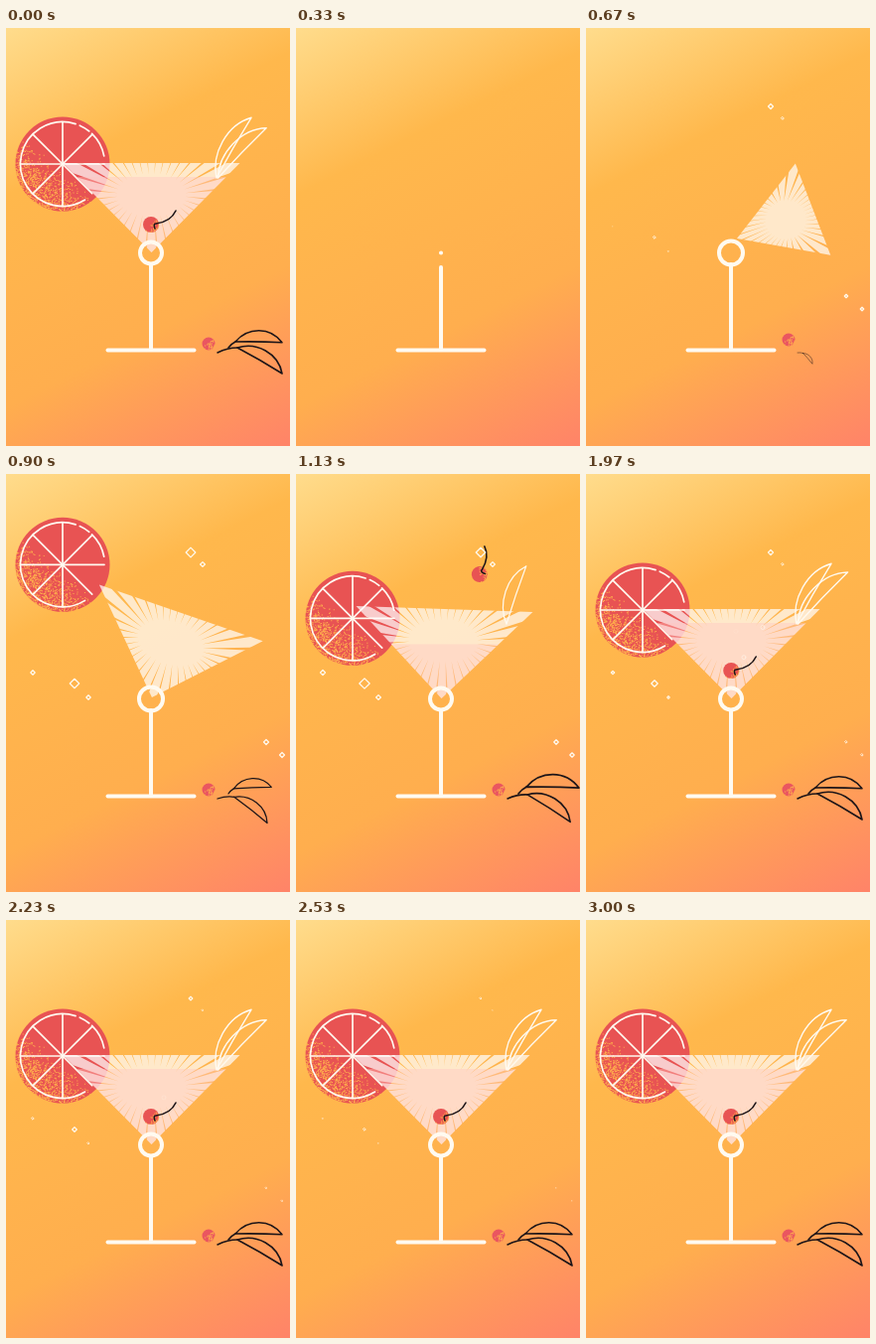
Animation, 286 px wide and 421 px high, one loop 3030 ms. Source, as an HTML page with a canvas:

```html
<!DOCTYPE html>
<html lang="en">
<head>
<meta charset="utf-8">
<title>Cocktail</title>
<style>
html, body { margin: 0; width: 100%; height: 100%; overflow: hidden; background: #ffb54a; }
canvas { display: block; }
</style>
</head>
<body>
<canvas id="stage" width="286" height="421"></canvas>
<script>
const ctx = document.getElementById('stage').getContext('2d');
const LOOP = 3030, RAD = Math.PI / 180, TURN = 2 * Math.PI;
const WHITE = '#fffaf0', RED = '#e85353', DARK = '#1d1518', ORANGE = '#ffb14c';

const clamp = v => Math.max(0, Math.min(1, v));
const mix = (a, b, p) => a + (b - a) * p;

// Cubic ease-out from 0 to 1; "over" makes it swing past 1 before settling.
function ease(t, start, duration, over = 0) {
  const u = clamp((t - start) / duration) - 1;
  return 1 + (1 + over) * u ** 3 + over * u ** 2;
}

function grain(radius, count, angle, bias) {
  let seed = 7;
  const rnd = () => (seed = seed * 16807 % 2147483647) / 2147483647;
  const path = new Path2D();
  for (let i = 0; i < count; i++) {
    const r = radius * Math.sqrt(rnd()), a = rnd() * TURN;
    const depth = r / radius * Math.cos(a - angle * RAD) + bias;
    if (rnd() < depth) path.rect(r * Math.cos(a) - .5, r * Math.sin(a) - .5, 1, 1);
  }
  return path;
}
const limeGrain = grain(47.5, 5500, 130, -.1);
const cherryGrain = grain(8, 130, 50, .1);
const berryGrain = grain(6.5, 100, 50, .3);

// Glass bowl: rays around a solid oval centre
const bowl = new Path2D('M0 0L-89-90H89Z');
const burst = new Path2D();
for (let i = 0; i < 36; i++) {
  const add = (rx, ry, deg) => burst.lineTo(rx * Math.cos(deg * RAD), -58 + ry * Math.sin(deg * RAD));
  add(100, 100, i * 10 - 3.8);
  add(100, 100, i * 10 + 3.8);
  add(34, 21, i * 10 + 5);
}
burst.closePath();

const leaf = new Path2D('M0 0C13-15 37-16 50 0Q25-1 0 0');
const cherryStem = new Path2D('M4 4Q2-1 5-1Q20-3 25-14');

const sky = ctx.createLinearGradient(0, 0, 226, 448);
sky.addColorStop(0, '#ffdc8c');
sky.addColorStop(.3, '#ffb84c');
sky.addColorStop(.68, '#ffae4e');
sky.addColorStop(1, '#ff8468');

function at(x, y, deg, sx, sy, draw) {
  if (sx <= 0 || sy <= 0) return;
  ctx.save();
  ctx.translate(x, y);
  ctx.rotate(deg * RAD);
  ctx.scale(sx, sy);
  draw();
  ctx.restore();
}

function stroke(path, color, width) {
  ctx.strokeStyle = color;
  ctx.lineWidth = width;
  ctx.stroke(path);
}

function arc(x, y, r, width, from = 0, to = 360) {
  const path = new Path2D();
  path.arc(x, y, r, from * RAD, to * RAD);
  stroke(path, WHITE, width);
}

function line(x1, y1, x2, y2, width) {
  stroke(new Path2D(`M${x1} ${y1}L${x2} ${y2}`), WHITE, width);
}

function disc(r, color, dots) {
  ctx.fillStyle = color;
  ctx.beginPath();
  ctx.arc(0, 0, r, 0, TURN);
  ctx.fill();
  ctx.fillStyle = ORANGE;
  ctx.fill(dots);
}

function lime(t) {
  at(57, mix(-50, 137, ease(t, 720, 700, 1.15)), 0, 1, 1, () => {
    disc(47.5, RED, limeGrain);
    for (let deg = 0; deg < 360; deg += 45)
      line(0, 0, 42 * Math.cos(deg * RAD), 42 * Math.sin(deg * RAD), 1.7);
    arc(0, 0, 42.5, 1.7, 58, 288);
    arc(0, 0, 42.5, 1.7, 294, 309);
    arc(0, 0, 42.5, 1.7, 314, 349);
  });
}

function glass(t) {
  const settle = ease(t, 670, 400);
  const angle = mix(110, 0, ease(t, 560, 770));
  at(mix(152, 146.5, settle), mix(212, 226, settle), angle, ease(t, 560, 470), ease(t, 560, 200), () => {
    ctx.clip(bowl);
    ctx.fillStyle = 'rgba(255,255,255,.7)';
    ctx.fill(burst);
    ctx.setTransform(1, 0, 0, 1, 0, 0);
    ctx.fillStyle = 'rgba(255,195,190,.4)';
    const level = mix(228, 150, ease(t, 900, 660));
    ctx.fillRect(0, level, 286, 230 - level);
  });
}

function cherry(t) {
  const x = mix(211, 146, ease(t, 940, 1210));
  const y = mix(-30, 198, ease(t, 940, 770));
  at(x, y, mix(-101, 0, ease(t, 940, 930)), 1, 1, () => {
    disc(8, RED, cherryGrain);
    stroke(cherryStem, DARK, 1.6);
  });
}

function topLeaf(x, start, fromAngle, toAngle) {
  return t => {
    const size = 1.4 * ease(t, start, 950, 2.8);
    at(x, 151, mix(fromAngle, toAngle, ease(t, start, 1000)), size, size * .8,
      () => stroke(leaf, WHITE, 1.2));
  };
}

function groundLeaves(t) {
  const low = ease(t, 600, 700), high = ease(t, 720, 800, 2);
  at(213, 327, mix(24, 0, ease(t, 600, 1000)), low, low, () => {
    stroke(new Path2D('M0 0Q10-5 20-5'), DARK, 1.6);
    at(20, -5, 30, 1.04, 1, () => stroke(leaf, DARK, 1.6));
  });
  at(224, 322, mix(-20, 0, ease(t, 720, 400)), high, high, () => {
    stroke(new Path2D('M0 0Q3-4 7-6'), DARK, 1.6);
    at(7, -6, 1, .94, 1, () => stroke(leaf, DARK, 1.6));
  });
}

function stand(t) {
  const half = 43.5 * ease(t, 30, 250);
  const height = 86 * ease(t, 130, 300);
  const ring = 11 * ease(t, 330, 800, 2);
  const berry = ease(t, 400, 250, 1.7);
  if (half > 0) line(146 - half, 324.4, 146 + half, 324.4, 4);
  if (height > 0) line(146, 324, 146, 324 - height, 4);
  if (ring > 0) arc(146, 226.5, ring, 4);
  at(204, 318 - 4 * Math.sin(Math.PI * clamp((t - 520) / 300)), 0, berry, berry,
    () => disc(6.5, '#ea5660', berryGrain));
}

function shine(t) {
  const spots = [[186, 79, 5], [198, 91, 2.5], [27, 200, 2.5], [69, 211, 5.2],
    [83, 225, 2.4], [262, 270, 2.7], [278, 283, 2.7]];
  for (const [x, y, size] of spots) {
    // Spots further right appear and fade sooner
    const peak = 1600 - 3 * x;
    const r = size * ease(t, 660 - x / 2, 500) * clamp((2900 - t) / (2900 - peak));
    if (r > .15)
      stroke(new Path2D(`M${x} ${y - r}l${r} ${r}l${-r} ${r}l${-r} ${-r}Z`), WHITE, Math.min(1.2, r * .7));
  }
  [[172, 170], [151, 163], [178, 156], [159, 183]].forEach(([x, y], i) => {
    const u = clamp((t - 1400 - 140 * i) / 450);
    ctx.globalAlpha = .6 * Math.sin(u * Math.PI);
    arc(x, y + 5 - 10 * u, 2, 1);
    ctx.globalAlpha = 1;
  });
}

const parts = [lime, glass, cherry, stand, topLeaf(212, 930, -82, -60),
  topLeaf(213.5, 1130, -80, -46), groundLeaves, shine];

const begin = performance.now();
function tick() {
  const now = (performance.now() - begin) % LOOP;
  const t = now < 30 ? LOOP : now;
  ctx.lineCap = ctx.lineJoin = 'round';
  ctx.fillStyle = sky;
  ctx.fillRect(0, 0, 286, 421);
  parts.forEach(part => part(t));
  requestAnimationFrame(tick);
}
tick();
</script>
</body>
</html>
```
